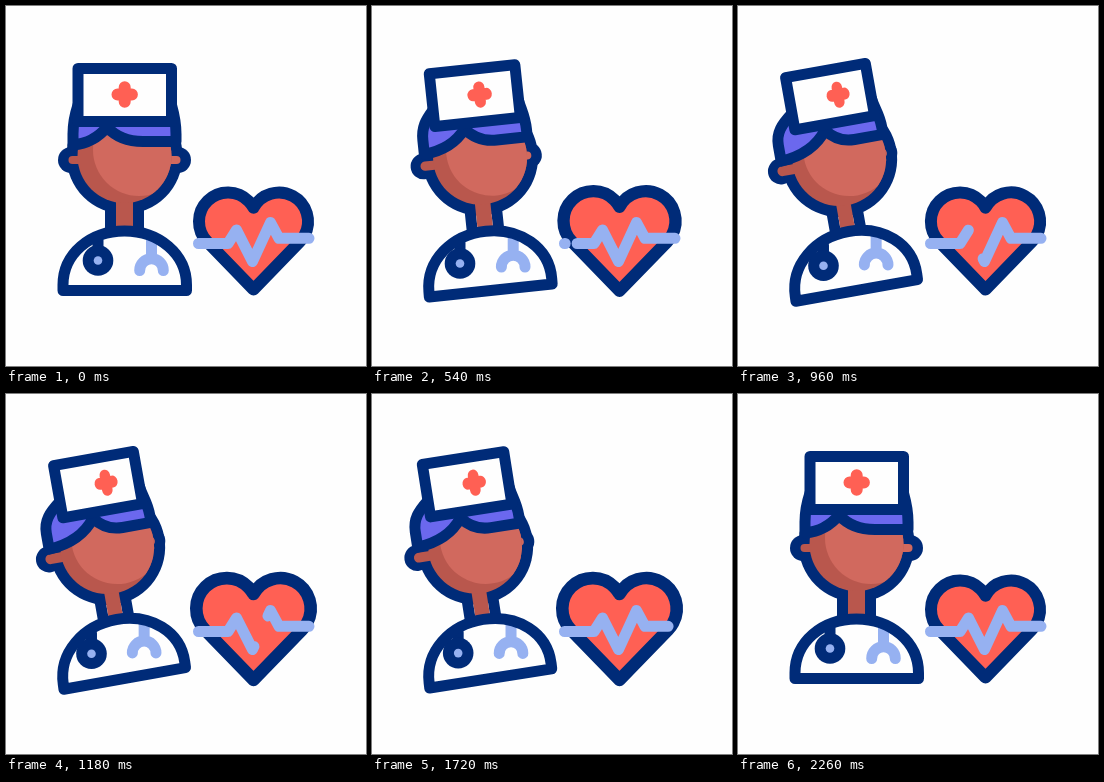
These frames come from a looping animation (360 px wide and 360 px high, 2.4 s). An HTML page with a canvas:

```html
<!DOCTYPE html>
<html lang="en">
<head>
<meta charset="utf-8">
<title>Nurse and heartbeat</title>
<style>
html, body { margin: 0; width: 100%; height: 100%; overflow: hidden; background: #fefefe; }
canvas { display: block; width: 100vmin; height: 100vmin; }
</style>
</head>
<body>
<canvas id="stage"></canvas>
<script>
const LOOP = 2400, SIZE = 360;
const NAVY = '#002b78', RED = '#ff6054', BLUE = '#96b1f1', WHITE = '#fefefe';
const SKIN = '#d1695e', SHADE = '#b9574d', HAIR = '#6b68ee';
const LINE = 11, TILT = 10.1;
const canvas = document.getElementById('stage');
const ctx = canvas.getContext('2d');
const rad = deg => deg * Math.PI / 180;

// Smooth 0..1 ramp between two times
function ramp(t, from, to) {
  const x = Math.min(1, Math.max(0, (t - from) / (to - from)));
  return x * x * (3 - 2 * x);
}

function stroke(path, color, width = LINE) {
  ctx.strokeStyle = color;
  ctx.lineWidth = width;
  ctx.stroke(path);
}

function fill(path, color) {
  ctx.fillStyle = color;
  ctx.fill(path);
}

function shape(path, color, width = LINE) {
  fill(path, color);
  stroke(path, NAVY, width);
}

function circle(x, y, r) {
  const p = new Path2D();
  p.arc(x, y, r, 0, 2 * Math.PI);
  return p;
}

const disc = (x, y, r, color) => fill(circle(x, y, r), color);

// Runs a drawing turned by some degrees about a point
function turned(x, y, deg, paint) {
  ctx.save();
  ctx.translate(x, y);
  ctx.rotate(rad(deg));
  ctx.translate(-x, -y);
  paint();
  ctx.restore();
}

const bodyPath = new Path2D('M57 284.5V279C57 248 84 225 118.5 225S180.5 248 180.5 279V284.5Z');
const tubePath = new Path2D('M92 234V254');
const forkPath = new Path2D('M145.5 233V251M133.7 264.5A11.8 11.8 0 0 1 157.3 264.5');
const crossPath = new Path2D('M-7.2 0H7.2M0 -7.2V7.2');

const heartPath = new Path2D();
heartPath.arc(222, 215.5, 29, rad(135.6), rad(331.6));
heartPath.arc(273, 215.5, 29, rad(208.4), rad(404.4));
heartPath.lineTo(247.5, 283.5);
heartPath.closePath();

const pulse = [[192.5, 237.5], [222, 237.5], [230.5, 224], [246.5, 255.5],
  [264.5, 216.5], [273, 232.3], [303, 232.3]];
const spans = pulse.slice(1).map(([x, y], i) => Math.hypot(x - pulse[i][0], y - pulse[i][1]));
const total = spans.reduce((a, b) => a + b);

// Draws the pulse line between two fractions of its length
function drawPulse(from, to) {
  if (to - from < 1e-4) return;
  const path = new Path2D();
  let pos = 0;
  spans.forEach((len, i) => {
    const a = Math.max(0, (from * total - pos) / len);
    const b = Math.min(1, (to * total - pos) / len);
    pos += len;
    if (a >= b) return;
    const [x0, y0] = pulse[i], [x1, y1] = pulse[i + 1];
    if (i === 0 || a > 0) path.moveTo(x0 + (x1 - x0) * a, y0 + (y1 - y0) * a);
    path.lineTo(x0 + (x1 - x0) * b, y0 + (y1 - y0) * b);
  });
  stroke(path, BLUE);
}

function drawHead(turn) {
  const hatLeft = 72 + 14 * turn, hatRight = 165.5 + 1.5 * turn;
  const part = 101 + 14.5 * turn, sideRight = 170 + 2 * turn;
  const earRight = 172 - 2 * turn, faceX = 118.5 + 6 * turn, faceY = 150 + 2 * turn;
  const neckLeft = 104.5 + 3.5 * turn, neckRight = 132.5 + turn;
  const fringe = 139 + 5 * turn;

  stroke(new Path2D(`M${neckLeft} 198V226M${neckRight} 198V226`), NAVY);
  disc(65, 154, 13, NAVY);
  disc(earRight, 154, 13, NAVY);
  disc(faceX, faceY, 58, NAVY);
  stroke(new Path2D('M66.5 154H90'), SHADE, 8 + 2 * turn);
  stroke(new Path2D(`M150 154H${earRight - 1.5}`), SKIN, 8);
  fill(new Path2D(`M${neckLeft + 5.5} 190H${neckRight - 5.5}V222H${neckLeft + 5.5}Z`), SHADE);

  const face = circle(faceX, faceY, 47);
  fill(face, SHADE);
  ctx.save();
  ctx.clip(face);
  disc(133 + 3 * turn, 144 + turn, 46, SKIN);
  ctx.restore();

  shape(new Path2D(`M67 ${fringe}V128C67 115 ${69 + 5 * turn} 108 ${hatLeft} 99H${hatRight}
    C168 108 ${sideRight} 115 ${sideRight} 128V135.5H${137 + 6 * turn}
    Q${114 + 12 * turn} 135.5 ${part} 121Q${88 + 12 * turn} ${137 + 5 * turn} 67 ${fringe}Z`), HAIR);

  shape(new Path2D(`M${hatLeft} 62.5H${hatRight}V115.5H${hatLeft}Z`), WHITE);
  ctx.save();
  ctx.translate(118.7 + 16 * turn, 88.5);
  ctx.scale(1 - 0.12 * turn, 1);
  stroke(crossPath, RED, 12);
  ctx.restore();
}

function drawBody(turn) {
  const lean = 0.04 * turn;
  ctx.save();
  ctx.transform(1, 0, -lean, 1, lean * 284.5, 0);
  fill(bodyPath, WHITE);
  ctx.restore();

  // The stethoscope hangs upright while the body tilts
  turned(145.5, 245, TILT * turn, () => {
    ctx.translate(0, -1.5 * turn);
    stroke(forkPath, BLUE);
  });
  turned(92, 245, TILT * turn, () => {
    stroke(tubePath, NAVY);
    disc(92, 254.5, 15.3, NAVY);
    disc(92, 254.5, 4.3, BLUE);
  });

  ctx.save();
  ctx.transform(1, 0, -lean, 1, lean * 284.5, 0);
  stroke(bodyPath, NAVY);
  ctx.restore();
}

function drawHeart(t) {
  const beat = t > 400 && t < 1990 ? Math.sin(Math.PI * (t - 400) / 530) ** 2 : 0;
  const s = 1 + 0.05 * beat;
  ctx.save();
  ctx.translate(247.5, 235);
  ctx.scale(s, s);
  ctx.translate(-247.5, -235);
  shape(heartPath, RED, 12);
  ctx.restore();
  const tail = ramp(t, 490, 1890), head = ramp(t, 310, 1700);
  if (tail >= head) {
    drawPulse(0, 1);
  } else {
    drawPulse(0, tail);
    drawPulse(head, 1);
  }
}

function draw(t) {
  const scale = canvas.width / SIZE;
  ctx.setTransform(scale, 0, 0, scale, 0, 0);
  ctx.fillStyle = WHITE;
  ctx.fillRect(0, 0, SIZE, SIZE);
  ctx.lineCap = ctx.lineJoin = 'round';

  const turn = ramp(t, 205, 800) - ramp(t, 1580, 2250);
  turned(118.6, 284.5, -TILT * turn, () => {
    drawHead(turn);
    drawBody(turn);
  });
  drawHeart(t);
}

function resize() {
  const side = Math.min(innerWidth, innerHeight) || SIZE;
  canvas.width = canvas.height = Math.round(side * (devicePixelRatio || 1));
}

resize();
addEventListener('resize', resize);
const start = performance.now();
function tick() {
  draw((performance.now() - start) % LOOP);
  requestAnimationFrame(tick);
}
tick();
</script>
</body>
</html>
```
